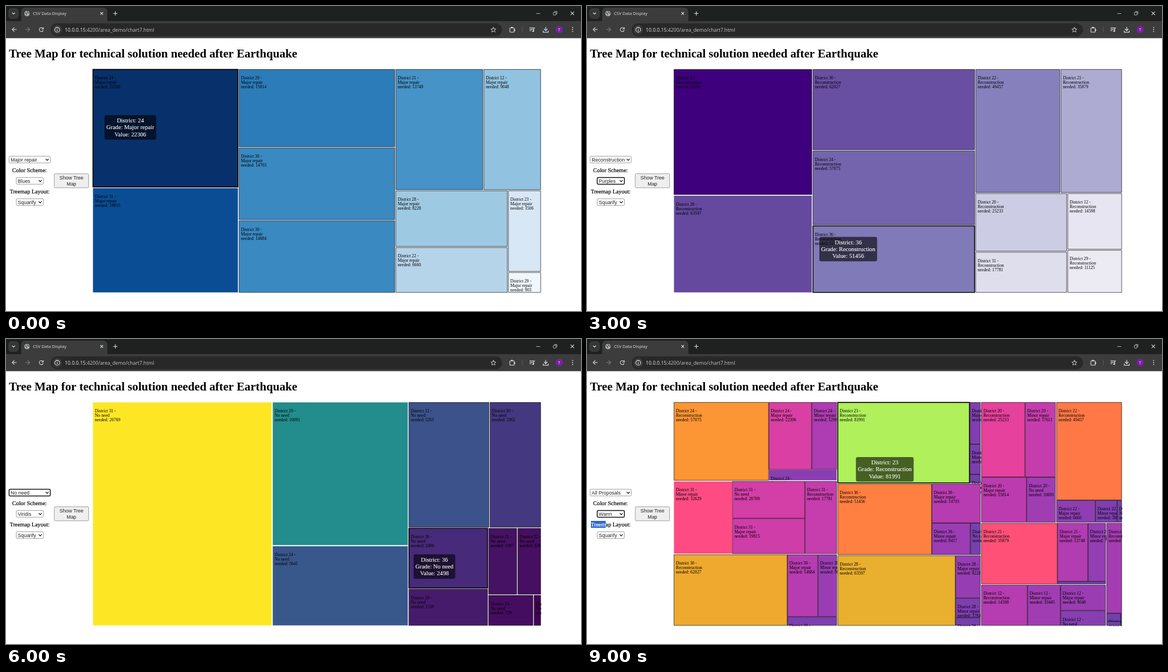
Animation of 1027x545 px, one loop 10000 ms. Source, as an HTML page with a canvas:

```html
<!DOCTYPE html>
<html lang="en">
<head>
<meta charset="utf-8">
<title>Tree map</title>
<style>
html, body { margin: 0; width: 100%; height: 100%; overflow: hidden; background: #fff; }
canvas { display: block; width: 1027px; height: 545px; }
</style>
</head>
<body>
<canvas id="stage" width="1027" height="545"></canvas>
<script>
const ctx = document.getElementById('stage').getContext('2d');
const ZOOM = 0.6686;
const CHART = { x: 154, y: 112, w: 1200, h: 600 };
const SERIF = '"Liberation Serif", serif';
const SANS = '"Liberation Sans", sans-serif';
const UI = '"Open Sans", sans-serif';

const GRADES = ['Reconstruction', 'Major repair', 'Minor repair', 'No need'];
const DATA = {
  24: [57075, 22306, 12997, 5641],
  31: [17781, 19815, 32629, 20769],
  30: [62027, 14684, 9049, 3362],
  23: [81991, 3506, 2515, 729],
  36: [51456, 14703, 9417, 2498],
  28: [63597, 8228, 3784, 1539],
  20: [25233, 15814, 17611, 10091],
  22: [49457, 6660, 3693, 829],
  21: [35879, 13748, 7978, 1007],
  12: [14598, 9048, 10445, 5261],
  29: [11125, 903, 480, 125]
};

// One state per second; hover and left hold "district grade" keys.
// Tiles the pointer has left lose their outline until the next redraw.
const STATES = [
  { grade: 'Major repair', scheme: 'Blues', hover: '24 Major repair', tip: [176, 195], left: ['31 Major repair'] },
  { grade: 'Reconstruction', scheme: 'Blues', focus: 'grade' },
  { grade: 'Reconstruction', scheme: 'Oranges', focus: 'scheme', hover: '20 Reconstruction', tip: [818, 318],
    left: ['23 Reconstruction', '24 Reconstruction', '22 Reconstruction'] },
  { grade: 'Reconstruction', scheme: 'Purples', focus: 'scheme', hover: '36 Reconstruction', tip: [415, 412.5],
    left: ['28 Reconstruction'] },
  { grade: 'Minor repair', scheme: 'Reds', hover: '12 Minor repair', tip: [542.3, 322], left: ['31 Minor repair'] },
  { grade: 'Minor repair', scheme: 'Viridis', focus: 'scheme' },
  { grade: 'No need', scheme: 'Viridis', focus: 'grade', hover: '36 No need', tip: [728, 384.8],
    left: ['31 No need', '20 No need', '24 No need'] },
  { grade: 'No need', scheme: 'Magma', focus: 'scheme', hover: '23 No need', tip: [903.5, 473],
    left: ['31 No need', '24 No need', '36 No need', '28 No need'] },
  { grade: 'All Proposals', scheme: 'Magma', focus: 'grade' },
  { grade: 'All Proposals', scheme: 'Warm', focus: 'scheme', hover: '23 Reconstruction', tip: [480.3, 211],
    left: ['31 Minor repair', '24 No need'], selected: true }
];

// ---- colour scales ----
const parse = list => list.split(' ').map(h => [0, 2, 4].map(i => parseInt(h.substr(i, 2), 16)));
const css = rgb => `rgb(${rgb.map(v => Math.round(Math.max(0, Math.min(255, v)))).join()})`;

function basis(list) {
  const c = parse(list), n = c.length - 1;
  return t => {
    const i = Math.min(n - 1, Math.floor(t * n)), f = t * n - i;
    return css([0, 1, 2].map(k => {
      const b = c[i][k], d = c[i + 1][k];
      const a = i > 0 ? c[i - 1][k] : 2 * b - d;
      const e = i < n - 1 ? c[i + 2][k] : 2 * d - b;
      return ((1 - f) ** 3 * a + (4 - 6 * f * f + 3 * f ** 3) * b
        + (1 + 3 * f + 3 * f * f - 3 * f ** 3) * d + f ** 3 * e) / 6;
    }));
  };
}

function ramp(list) {
  const c = parse(list), n = c.length - 1;
  return t => {
    const i = Math.min(n - 1, Math.floor(t * n)), f = t * n - i;
    return css(c[i].map((v, k) => v + (c[i + 1][k] - v) * f));
  };
}

function warm(t) {
  const h = (20 + 180 * t) * Math.PI / 180, l = 0.35 + 0.45 * t;
  const a = (0.75 + 0.75 * t) * l * (1 - l), c = Math.cos(h), s = Math.sin(h);
  return css([l + a * (1.78277 * s - 0.14861 * c), l - a * (0.29227 * c + 0.90649 * s), l + a * 1.97294 * c]
    .map(v => v * 255));
}

const SCHEMES = {
  Blues: basis('f7fbff deebf7 c6dbef 9ecae1 6baed6 4292c6 2171b5 08519c 08306b'),
  Oranges: basis('fff5eb fee6ce fdd0a2 fdae6b fd8d3c f16913 d94801 a63603 7f2704'),
  Purples: basis('fcfbfd efedf5 dadaeb bcbddc 9e9ac8 807dba 6a51a3 54278f 3f007d'),
  Reds: basis('fff5f0 fee0d2 fcbba1 fc9272 fb6a4a ef3b2c cb181d a50f15 67000d'),
  Viridis: ramp('440154 482475 414487 355f8d 2a788e 21918c 22a884 44bf70 7ad151 bddf26 fde725'),
  Magma: ramp('000004 140e36 3b0f70 641a80 8c2981 b73779 de4968 f7705c fe9f6d fecf92 fcfdbf'),
  Warm: warm
};

// ---- squarified layout ----
function squarify(nodes, x0, y0, x1, y1) {
  const golden = (1 + Math.sqrt(5)) / 2;
  let left = nodes.reduce((s, n) => s + n.value, 0), i = 0;
  while (i < nodes.length) {
    const dx = x1 - x0, dy = y1 - y0, start = i;
    const alpha = Math.max(dy / dx, dx / dy) / (left * golden);
    const max = nodes[i].value;
    let sum = 0, best = Infinity;
    for (; i < nodes.length; i++) {
      const v = nodes[i].value, beta = (sum + v) ** 2 * alpha;
      const worst = Math.max(max / beta, beta / v);
      if (worst > best) break;
      best = worst;
      sum += v;
    }
    const across = dx < dy, part = sum / left;
    let pos = across ? x0 : y0;
    for (const n of nodes.slice(start, i)) {
      const size = (across ? dx : dy) * n.value / sum;
      Object.assign(n, across
        ? { x0: pos, x1: pos + size, y0, y1: y0 + dy * part }
        : { y0: pos, y1: pos + size, x0, x1: x0 + dx * part });
      pos += size;
    }
    if (across) y0 += dy * part; else x0 += dx * part;
    left -= sum;
  }
}

const byValue = (a, b) => b.value - a.value;

function layout(grade) {
  const groups = Object.keys(DATA).map(district => {
    const leaves = GRADES.map((g, i) => ({ district, grade: g, key: district + ' ' + g, value: DATA[district][i] }))
      .filter(l => grade === 'All Proposals' || l.grade === grade).sort(byValue);
    return { leaves, value: leaves.reduce((s, l) => s + l.value, 0) };
  }).sort(byValue);
  squarify(groups, 0.5, 0.5, CHART.w - 0.5, CHART.h - 0.5);
  for (const g of groups) squarify(g.leaves, g.x0 + 1, g.y0 + 1, g.x1 - 1, g.y1 - 1);
  return groups.flatMap(g => g.leaves).map(l => ({
    ...l,
    x: CHART.x + (l.x0 + 0.5) * ZOOM, y: CHART.y + (l.y0 + 0.5) * ZOOM,
    w: Math.max(0, l.x1 - l.x0 - 1) * ZOOM, h: Math.max(0, l.y1 - l.y0 - 1) * ZOOM
  }));
}

// ---- drawing helpers ----
function text(str, x, y, font, color = '#000', align = 'left', weight = 0) {
  ctx.font = font;
  ctx.textAlign = align;
  ctx.fillStyle = ctx.strokeStyle = color;
  ctx.fillText(str, x, y);
  if (weight) { ctx.lineWidth = weight; ctx.strokeText(str, x, y); }
}

function box(x, y, w, h, r, fill, stroke, width = 1) {
  ctx.beginPath();
  ctx.roundRect(x, y, w, h, r);
  if (fill) { ctx.fillStyle = fill; ctx.fill(); }
  if (stroke) { ctx.strokeStyle = stroke; ctx.lineWidth = width; ctx.stroke(); }
}

function line(points, color = '#dedede', width = 1.1) {
  ctx.beginPath();
  points.forEach(([x, y]) => ctx.lineTo(x, y));
  ctx.strokeStyle = color;
  ctx.lineWidth = width;
  ctx.stroke();
}

function disc(x, y, r, fill, stroke, from = 0, to = Math.PI * 2) {
  ctx.beginPath();
  ctx.arc(x, y, r, from, to);
  if (fill) { ctx.fillStyle = fill; ctx.fill(); }
  if (stroke) { ctx.strokeStyle = stroke; ctx.lineWidth = 1.1; ctx.stroke(); }
}

function cross(x, y, r) {
  line([[x - r, y - r], [x + r, y + r]]);
  line([[x - r, y + r], [x + r, y - r]]);
}

function arrow(x, dir, color) {
  line([[x - 4 * dir, 42], [x + 4 * dir, 42]], color);
  line([[x, 38.2], [x - 4 * dir, 42], [x, 45.8]], color);
}

// ---- browser frame ----
function drawTabs() {
  box(0, 0, 1027, 28, 0, '#1f2020');
  box(4, 4, 19, 19, 6, '#363737');
  line([[11, 12], [13.5, 14.5], [16, 12]], '#dedede', 1.2);
  box(27, 3, 154, 30, 7, '#3c3c3c');
  disc(37.5, 13.5, 4.8, '#aeb1b5');
  line([[34, 12], [37, 13.5], [36.5, 16.5]], '#4a4b4d', 1.4);
  line([[37.5, 9.5], [39, 12], [41.5, 13]], '#4a4b4d', 1.4);
  text('CSV Data Display', 48, 16.2, '7.6px ' + UI, '#e3e3e3');
  cross(171, 13.3, 2.3);
  line([[191.5, 13.3], [199, 13.3]]);
  line([[195.3, 9.6], [195.3, 17]]);
  line([[947, 13.5], [954, 13.5]], '#dedede', 0.8);
  box(977.5, 11.2, 5, 5, 1, null, '#dedede', 0.8);
  line([[979.3, 9.8], [984, 9.8], [984, 14.6]], '#dedede', 0.8);
  cross(1011.5, 13.2, 3);
}

function drawToolbar(downloading) {
  box(0, 27, 1027, 30.5, 0, '#3c3c3c');
  arrow(15, 1, '#dedede');
  arrow(38.5, -1, '#7b7b7b');
  disc(63, 42.2, 3.5, null, '#dedede', 0.3, 5.6);
  line([[66.7, 38], [66.7, 41.2], [63.6, 41.2]]);
  box(80, 31, 806, 23, 11.5, '#282828');
  disc(91.5, 42.4, 8.5, '#3a3a3a');
  disc(91.5, 42.4, 4.3, null, '#e3e3e3');
  line([[91.5, 41.8], [91.5, 44.8]], '#e3e3e3');
  line([[91.5, 39.8], [91.5, 40.8]], '#e3e3e3');
  const font = '8.8px ' + UI, host = '10.0.0.15';
  text(host, 105, 45.6, font, '#e8e8e8');
  const hostWidth = ctx.measureText(host).width;
  text(':4200/area_demo/chart7.html', 105 + hostWidth, 45.6, font, '#c4c4c4');

  const star = Array.from({ length: 12 }, (_, i) => {
    const a = i * Math.PI / 5 - Math.PI / 2, r = i % 2 ? 2.1 : 4.8;
    return [870.5 + r * Math.cos(a), 42.7 + r * Math.sin(a)];
  });
  line(star, '#dedede', 0.9);
  box(900, 39, 7.8, 7.8, 1, null, '#dedede', 1.1);
  disc(903.7, 38.6, 1.5, '#dedede');
  disc(908.2, 43, 1.5, '#dedede');
  line([[922, 37.5], [922, 47]], '#666', 0.9);
  for (const [y, end] of [[39, 942], [41.5, 942], [44, 938.5]]) line([[935, y], [end, y]]);
  disc(941.5, 44.7, 1.5, '#dedede');
  line([[942.6, 44.7], [942.6, 39.2], [945, 39.2]]);
  const color = downloading ? '#c2d7fb' : '#dedede';
  line([[964, 37.5], [964, 43.4]], color, 1.3);
  line([[961, 41], [964, 44], [967, 41]], color, 1.3);
  line([[959.5, 44], [959.5, 46.8], [968.5, 46.8], [968.5, 44]], color, 1.2);
  disc(988, 42, 6.6, '#7b1fa2');
  text('T', 988, 44.6, '7px ' + UI, '#fff', 'center');
  for (const y of [38.5, 42, 45.5]) disc(1012, y, 0.9, '#dedede');
}

// ---- page ----
function select(label, x, y, w, focused) {
  box(x, y, w, 12, 1.7, '#fff', focused ? '#101010' : '#767676', focused ? 1.5 : 0.7);
  text(label, x + 2.8, y + 9.2, '8.9px ' + SANS, '#222');
  const cx = x + w - 5.6, cy = y + 6;
  line([[cx - 2.6, cy - 1.2], [cx, cy + 1.5], [cx + 2.6, cy - 1.2]], '#000', 1.1);
}

function drawControls(state) {
  text('Tree Map for technical solution needed after Earthquake', 5.3, 92.3, 'bold 21.18px ' + SERIF);
  const font = '10.35px ' + SERIF;
  select(state.grade, 5.5, 268.4, 73.6, state.focus === 'grade');
  text('Color Scheme:', 42, 296.7, font, '#000', 'center', 0.2);
  select(state.scheme, 18.3, 306.4, 48.4, state.focus === 'scheme');
  text('Treemap Layout:', 42.3, 334.7, font, '#000', 'center', 0.2);
  if (state.selected) {
    box(7, 325, 26.5, 12.5, 0, '#3067d0');
    text('Treem', 6.8, 334.7, font, '#fff', 'left', 0.2);
  }
  select('Squarify', 18.3, 344.4, 48.4, false);
  box(86.2, 299.8, 61.4, 25, 1.7, '#efefef', '#767676', 0.7);
  text('Show Tree', 116.9, 310.2, '8.9px ' + SANS, '#222', 'center');
  text('Map', 116.9, 320.8, '8.9px ' + SANS, '#222', 'center');
}

function drawMap(state, leaves) {
  const max = Math.max(...leaves.map(l => l.value));
  ctx.save();
  ctx.beginPath();
  ctx.rect(CHART.x, CHART.y, CHART.w * ZOOM, CHART.h * ZOOM);
  ctx.clip();
  for (const l of leaves) {
    const hovered = l.key === state.hover;
    const stroke = state.left && state.left.includes(l.key) ? null : '#000';
    box(l.x, l.y, l.w, l.h, 0, SCHEMES[state.scheme](l.value / max), stroke, hovered ? 1.6 : ZOOM);
    [`District ${l.district} -`, l.grade, `needed: ${l.value}`].forEach((row, i) =>
      text(row, l.x + 3.4, l.y + 17.8 + i * 8, '7.75px ' + SERIF));
  }
  ctx.restore();
}

function drawTip(state, leaves) {
  if (!state.tip) return;
  const leaf = leaves.find(l => l.key === state.hover), [x, y] = state.tip;
  const rows = [`District: ${leaf.district}`, `Grade: ${leaf.grade}`, `Value: ${leaf.value}`];
  const font = '10.7px ' + SERIF;
  ctx.font = font;
  const w = Math.max(...rows.map(r => ctx.measureText(r).width)) + 6.7;
  box(x, y, w, 43.8, 3.3, 'rgba(0,0,0,0.6)');
  rows.forEach((row, i) => text(row, x + w / 2, y + 13 + i * 12.3, font, '#fff', 'center', 0.12));
}

function draw(index) {
  const state = STATES[index], leaves = layout(state.grade);
  box(0, 0, 1027, 545, 0, '#fff');
  drawTabs();
  drawToolbar(index < 3);
  drawControls(state);
  drawMap(state, leaves);
  drawTip(state, leaves);
}

let shown = -1;
function tick() {
  const index = Math.floor(performance.now() / 1000) % STATES.length;
  if (index !== shown) draw(shown = index);
  requestAnimationFrame(tick);
}
tick();
</script>
</body>
</html>
```
